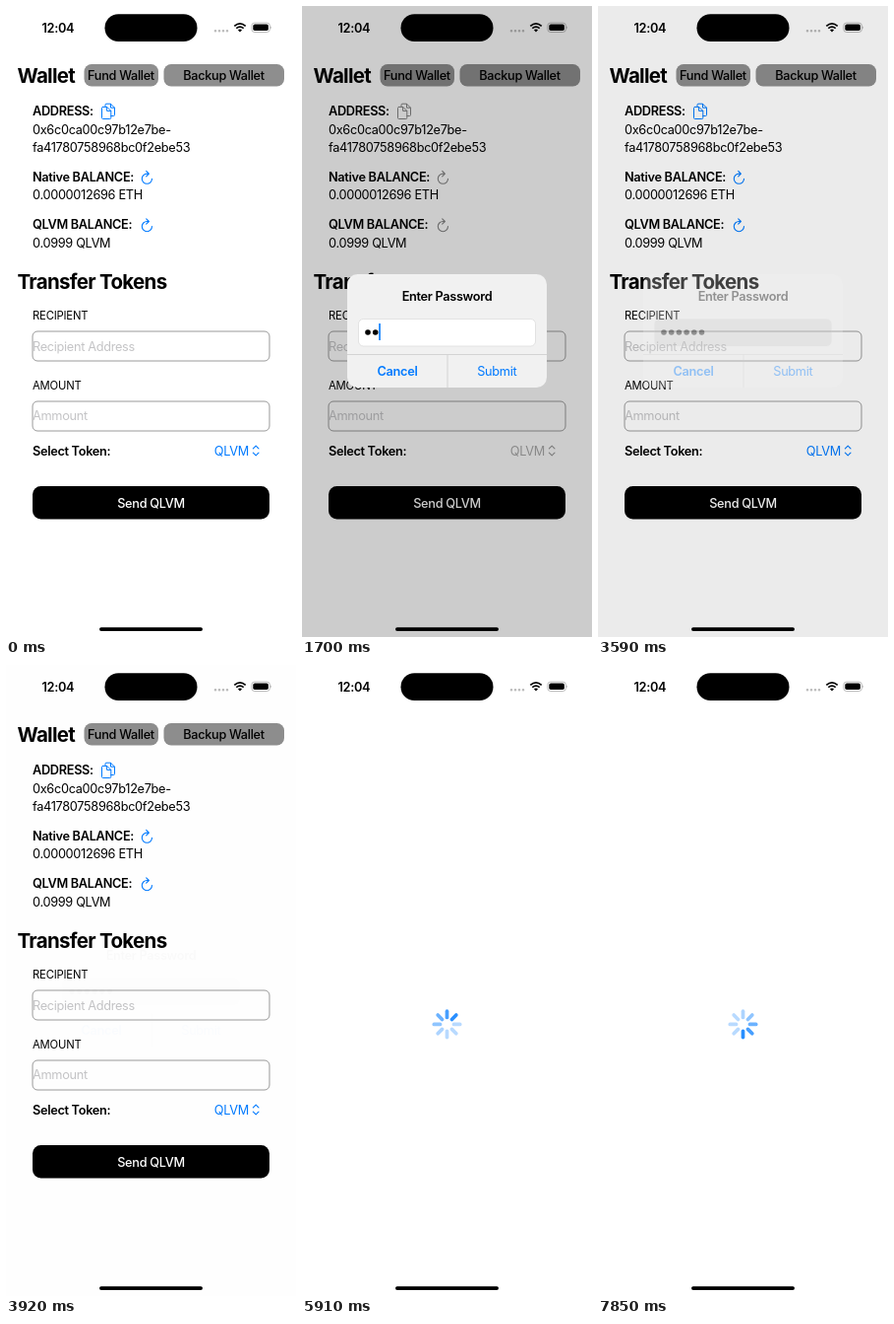
Animation of 295 by 640 pixels, one loop 8000 ms. Source, as an HTML page:

```html
<!DOCTYPE html>
<html lang="en">
<head>
<meta charset="utf-8">
<title>Wallet</title>
<style>
  html, body { margin: 0; width: 100%; height: 100%; overflow: hidden; background: #fff; }
  svg { display: block; width: 295px; height: 640px; }
  text { font: 400 12.75px Inter, sans-serif; letter-spacing: -.025em; }
  .label { font-weight: 600; }
  .button { font-weight: 500; }
  .title { font-size: 20.5px; font-weight: 700; letter-spacing: -.034em; }
  .small { font-size: 11.25px; letter-spacing: -.016em; }
  .hint { fill: #c4c4c6; }
  .mid { text-anchor: middle; }
  .line { fill: none; stroke-linecap: round; stroke-linejoin: round; }
  .blue { fill: #007aff; }
  .input { fill: #fff; stroke: #9a9a9a; }
</style>
</head>
<body>
<svg viewBox="0 0 295 640">
  <defs>
    <g id="refresh" class="line" stroke-width="1.1">
      <path d="M5.1 .6A5.1 5.1 0 1 1 0 -4.5H1.8M-.7 -7.2 2 -4.5 -.7 -1.8"/>
    </g>
    <clipPath id="panelClip"><rect x="46" y="272" width="203" height="115" rx="10.5"/></clipPath>
  </defs>
  <rect width="295" height="640" fill="#fff"/>

  <g id="wallet">
    <text class="title" x="11.5" y="77.5">Wallet</text>
    <rect x="79.5" y="59" width="75.5" height="22.5" rx="7.5" fill="#8e8e8e"/>
    <text class="button mid" x="117" y="75">Fund Wallet</text>
    <g id="backup">
      <rect x="160.5" y="59" width="122.5" height="22.5" rx="7.5" fill="#8e8e8e"/>
      <text id="backupText" class="button mid" x="221.5" y="75">Backup Wallet</text>
    </g>

    <text class="label" x="27" y="111">ADDRESS:</text>
    <text x="27" y="129.5">0x6c0ca00c97b12e7be-</text>
    <text x="27" y="147.5">fa41780758968bc0f2ebe53</text>
    <text class="label" x="27" y="178">Native BALANCE:</text>
    <text x="27" y="196">0.0000012696 ETH</text>
    <text class="label" x="27" y="226">QLVM BALANCE:</text>
    <text x="27" y="244.5">0.0999 QLVM</text>
    <g id="icons">
      <path class="line" stroke-width="1" d="M101 102.2V100.2Q101 99.2 102 99.2H106.5L110.5 103.2V110.5Q110.5 111.5 109.5 111.5H107M106.5 99.4V103.2H110.3M98.5 102.4H102.8L106.8 106.4V113.5Q106.8 114.5 105.8 114.5H98.5Q97.5 114.5 97.5 113.5V103.4Q97.5 102.4 98.5 102.4M102.6 102.6V106.4H106.6"/>
      <use href="#refresh" x="143.4" y="174.6"/>
      <use href="#refresh" x="143.4" y="223"/>
    </g>

    <text class="title" x="11.5" y="287">Transfer Tokens</text>
    <text class="small" x="27" y="318">RECIPIENT</text>
    <rect class="input" x="27" y="330" width="241" height="30" rx="5"/>
    <text class="hint" x="27" y="349.5">Recipient Address</text>
    <text class="small" x="27" y="388.5">AMOUNT</text>
    <rect class="input" x="27" y="401" width="241" height="30" rx="5"/>
    <text class="hint" x="27" y="420">Ammount</text>
    <text class="label" x="27" y="455.5">Select Token:</text>
    <text id="token" x="247" y="455.5" text-anchor="end">QLVM</text>
    <path id="chevrons" class="line" stroke-width="1.1" d="M251.4 448.8 254.2 446.2 257 448.8M251.4 453.2 254.2 455.8 257 453.2"/>
    <rect x="27" y="487" width="241" height="33.5" rx="8.5"/>
    <text class="button mid" x="147.5" y="508.5" fill="#fff">Send QLVM</text>
  </g>

  <g id="spinner" transform="translate(147.5 364.4)"></g>

  <text class="label" x="36.5" y="26.5">12:04</text>
  <rect x="100.5" y="8.3" width="94" height="27.7" rx="13.85"/>
  <path class="line" stroke="#bbb" stroke-width="2.6" d="M213 25.2h0M217 25.2h0M221 25.2h0M225 25.2h0"/>
  <path d="M238 26.5 235.9 24.3Q238 22.6 240.1 24.3Z"/>
  <path fill="none" stroke="#000" stroke-width="1.7" d="M234.3 22.7Q238 19.6 241.7 22.7M232.3 20.3Q238 15.4 243.7 20.3"/>
  <rect x="249.8" y="17.1" width="18.6" height="9.4" rx="3" fill="none" stroke="#aaa" stroke-width=".8"/>
  <rect x="251.3" y="18.6" width="15.6" height="6.4" rx="1.8"/>
  <path fill="#aaa" d="M269.3 20.2Q271 21.8 269.3 23.4Z"/>
  <rect x="95" y="630.2" width="105" height="3.8" rx="1.9"/>

  <rect id="dim" width="295" height="640"/>
  <g id="dialog">
    <rect id="panel" x="46" y="272" width="203" height="115" rx="10.5" fill="#f1f1f1"/>
    <g id="content">
      <text class="label mid" x="147.5" y="299.3">Enter Password</text>
      <rect id="field" x="57.5" y="317.5" width="180" height="27.5" rx="5" stroke-width=".7"/>
      <text id="placeholder" x="63" y="335.5">PASSWORD</text>
      <g id="dots"></g>
      <rect id="cursor" class="blue" y="322" width="1.6" height="17"/>
      <rect id="highlight" x="148" y="354" width="101" height="33" fill="#dadada" clip-path="url(#panelClip)"/>
      <path stroke="#cdcdcd" stroke-width=".8" d="M46 353.5H249M148 353.5V387"/>
      <text class="label mid blue" x="97" y="375.3">Cancel</text>
      <text class="mid blue" x="198.3" y="375.3">Submit</text>
    </g>
  </g>
</svg>

<script>
const LOOP = 8000, OPEN = 810, CLOSE = 3480, LOADING = 4250;
const CENTER = [147.5, 329.5];

// The picture only updates at these moments.
const updates = [
  0, 810, 910, 1010, 1120, 1220, 1320, 1470,
  1700, 1960, 2290, 2660, 3000, 3300,
  3480, 3590, 3690, 3800, 3900, 4000, 4100, 4250,
  4400, 4500, 4600, 4750, 4850, 4950, 5100, 5200, 5300, 5400, 5510, 5610,
  5760, 5910, 6010, 6120, 6220, 6370, 6520, 6620, 6720, 6830, 6930,
  7030, 7130, 7230, 7330, 7480, 7630, 7740, 7850
];
const keyTimes = [1700, 1700, 1960, 2290, 2660, 3000];
const spokeAlpha = [.84, .72, .58, .44, .32, .28, .28, .28];

const el = id => document.getElementById(id);
const set = (node, attrs) => {
  for (const name in attrs) node.setAttribute(name, attrs[name]);
  return node;
};
const add = (parent, tag, attrs) =>
  parent.appendChild(set(document.createElementNS(parent.namespaceURI, tag), attrs));
const show = (id, visible) => set(el(id), { visibility: visible ? 'visible' : 'hidden' });
const gray = level => `rgb(${level},${level},${level})`;

const spokes = spokeAlpha.map((_, i) => add(el('spinner'), 'path', {
  d: 'M0 -7V-13.2', class: 'line', stroke: '#007aff', 'stroke-width': 3.7, transform: `rotate(${i * 45})`
}));
const dots = keyTimes.map((_, i) => add(el('dots'), 'circle', { cx: 67 + 7.7 * i, cy: 331, r: 2.8 }));

// Critically damped spring from 0 to 1.
const spring = ms => {
  const x = Math.max(0, ms) * .0129;
  return 1 - (1 + x) * Math.exp(-x);
};

function drawDialog(t) {
  const closing = t >= CLOSE;
  const p = t < OPEN || t >= LOADING ? 0 : closing ? 1 - spring(t - 3430) : spring(t - 780);
  const scale = closing ? 1 : 1 + .19 * (1 - p);
  const [cx, cy] = CENTER;
  set(el('dim'), { opacity: .2 * p });
  set(el('dialog'), { transform: `translate(${cx} ${cy}) scale(${scale}) translate(${-cx} ${-cy})` });
  set(el('panel'), { opacity: p ** 1.4 });
  set(el('content'), { opacity: p });

  // The field looks gray while translucent and turns white once settled.
  const shade = Math.round(255 - 75 * Math.min(1, 1.6 * (1 - p)));
  set(el('field'), { fill: gray(shade), 'fill-opacity': p < .98 ? .45 : 1, stroke: gray(216), 'stroke-opacity': p });
  set(el('placeholder'), { fill: gray(shade - 60) });

  const typed = keyTimes.filter(k => t >= k).length;
  dots.forEach((dot, i) => set(dot, { opacity: i < typed ? 1 : 0 }));
  show('placeholder', !typed);
  show('cursor', !closing);
  set(el('cursor'), { x: 63 + 7.6 * typed });
  show('highlight', t >= 3300 && !closing);
}

function drawWallet(t) {
  const muted = t >= OPEN && t < CLOSE;
  const release = t < OPEN ? 1 : Math.min(1, .25 + (t - OPEN) / 500);
  show('wallet', t < LOADING);
  set(el('icons'), { stroke: muted ? '#858585' : '#007aff' });
  set(el('token'), { fill: muted ? '#aaa' : '#007aff' });
  set(el('chevrons'), { stroke: muted && t >= 1010 ? '#999' : '#007aff' });
  set(el('backup'), { opacity: .85 + .15 * release });
  set(el('backupText'), { opacity: release });
}

function drawSpinner(t) {
  show('spinner', t >= LOADING);
  const head = 6 + Math.floor((t - 4750) / 103 + .3);
  spokes.forEach((spoke, i) => set(spoke, { opacity: spokeAlpha[(head - i + 800) % 8] }));
}

function frame() {
  const now = performance.now() % LOOP;
  const t = updates.findLast(u => u <= now);
  drawWallet(t);
  drawDialog(t);
  drawSpinner(t);
  requestAnimationFrame(frame);
}
frame();
</script>
</body>
</html>
```
